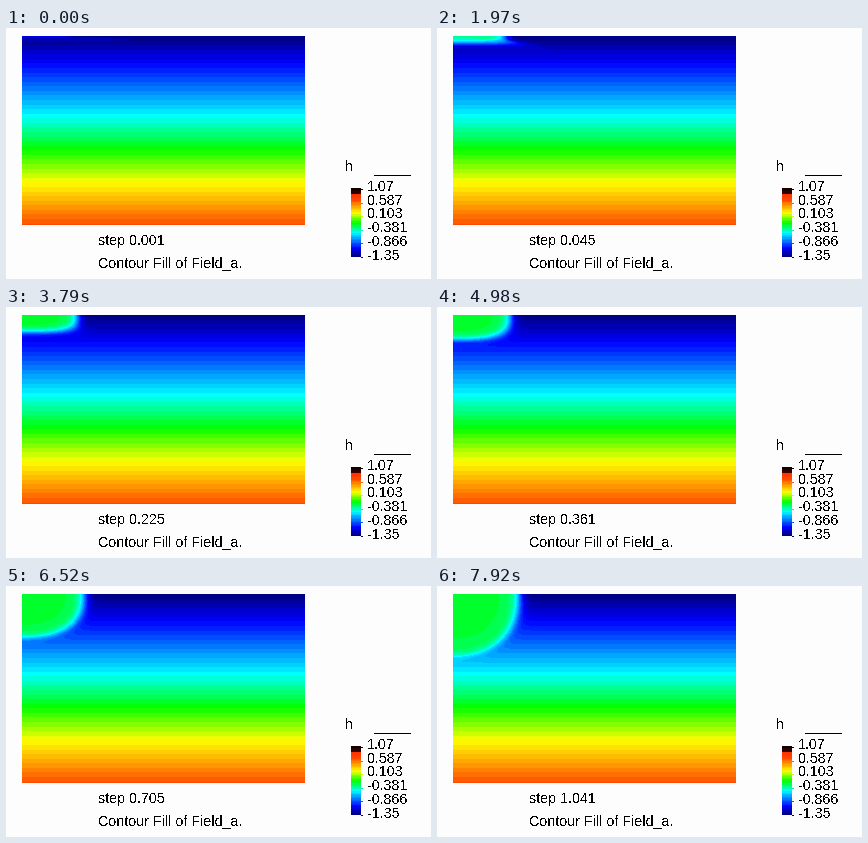
A matplotlib script that plays this animation: 425x251 px, repeating every 7.99 s.

```python
import numpy as np
import matplotlib.pyplot as plt
from matplotlib.animation import FuncAnimation
from matplotlib.lines import Line2D

W, H, DPI = 425, 251, 64
LEFT, TOP, FW, FH = 16, 8, 283, 189
H_MIN, H_MAX, LEVELS = -1.35, 1.07, 50
TICK, HOLD, STEP, LOOP = 10, 500, 70, 7990

STOPS = [0, .12, .35, .495, .64, .83, .915, .92, 1]
RED = [0, 0, 0, 0, 255, 255, 255, 70, 10]
GREEN = [0, 0, 255, 255, 255, 72, 50, 0, 0]
BLUE = [125, 255, 255, 0, 0, 0, 0, 0, 0]


def colour(head):
    """Banded colour scale for pressure head."""
    u = (head - H_MIN) / (H_MAX - H_MIN)
    u = (np.clip(np.floor(u * LEVELS), 0, LEVELS - 1) + .5) / LEVELS
    return np.stack([np.interp(u, STOPS, c) for c in (RED, GREEN, BLUE)],
                    axis=-1).astype(np.uint8)


def hydrostatic(y):
    return H_MIN + 2 * y / FH


def plume(t, x, y):
    """Head while water soaks in below the strip at the upper left."""
    reach = 47.5 + 15.5 * t ** .75
    depth = 3.3 * (1 - np.exp(-(t + .006) / .012)) + 54.7 * t
    p = 2.15 + 3 * np.exp(-t / .3)
    a, b = (x / reach) ** p, (y / depth) ** p
    f = (a + b) ** (1 / p)
    slope = f / (a + b) * np.hypot(a / x, b / y)
    dist = (f - 1) / slope
    width = 1.7 + 1.3 * a / (a + b)
    wet = 1 / (1 + np.exp(np.clip(dist / width - 1.15, -40, 40)))
    top = H_MIN + 1.14 * (1 - np.exp(-((t + .0015) / .015) ** .7))
    top = top - .09 * np.minimum(f, 1) ** 4
    base = hydrostatic(y)
    return base + np.maximum(top - base, 0) * wet


# The time step doubles at each stage of the run.
dt = np.repeat([.002, .004, .008, .016, .032], [22, 7, 37, 40, 1])
times = np.concatenate([[.001], .001 + np.cumsum(dt)])

ys, xs = np.mgrid[0:110, 0:110] + .5
patches = [colour(plume(t, xs, ys)) for t in times]

plt.rcParams["font.family"] = "Liberation Sans"
plt.rcParams["text.antialiased"] = False
fig = plt.figure(figsize=(W / DPI, H / DPI), dpi=DPI, facecolor="#fdfdfd")


def label(x, y, s):
    return fig.text(x / W, 1 - y / H, s, size=14.2 * 72 / DPI,
                    color="black", va="baseline")


def rule(x0, x1, y, c):
    fig.add_artist(Line2D([x0 / W, x1 / W], [1 - (y + .5) / H] * 2,
                          lw=72 / DPI, color=c, antialiased=False,
                          solid_capstyle="butt"))


def picture(rgb, x, y):
    return fig.figimage(rgb, x, H - y - rgb.shape[0], origin="upper")


rows = hydrostatic(np.arange(FH) + .5)
picture(colour(np.repeat(rows[:, None], FW, axis=1)), LEFT, TOP)
soak = picture(patches[0], LEFT, TOP)

scale = np.linspace(H_MAX, H_MIN, 69)
picture(colour(np.repeat(scale[:, None], 10, axis=1)), 345, 160)
for i, s in enumerate("1.07 0.587 0.103 -0.381 -0.866 -1.35".split()):
    label(361, 163 + 13.75 * i, s)
    rule(355, 356, round(160 + 13.6 * i), colour(np.array(float(s))) / 255)
label(339, 143, "h")
rule(368, 404, 146, "black")

counter = label(92, 217, "")
label(92, 239, "Contour Fill of Field_a.")


def draw(n):
    ms = n * TICK
    k = 0 if ms < HOLD else 1 + (ms - HOLD) // STEP
    soak.set_data(patches[k])
    counter.set_text(f"step {times[k]:.3f}")
    return soak, counter


anim = FuncAnimation(fig, draw, frames=LOOP // TICK, interval=TICK,
                     repeat=True, repeat_delay=0, cache_frame_data=False)
plt.show()
```
